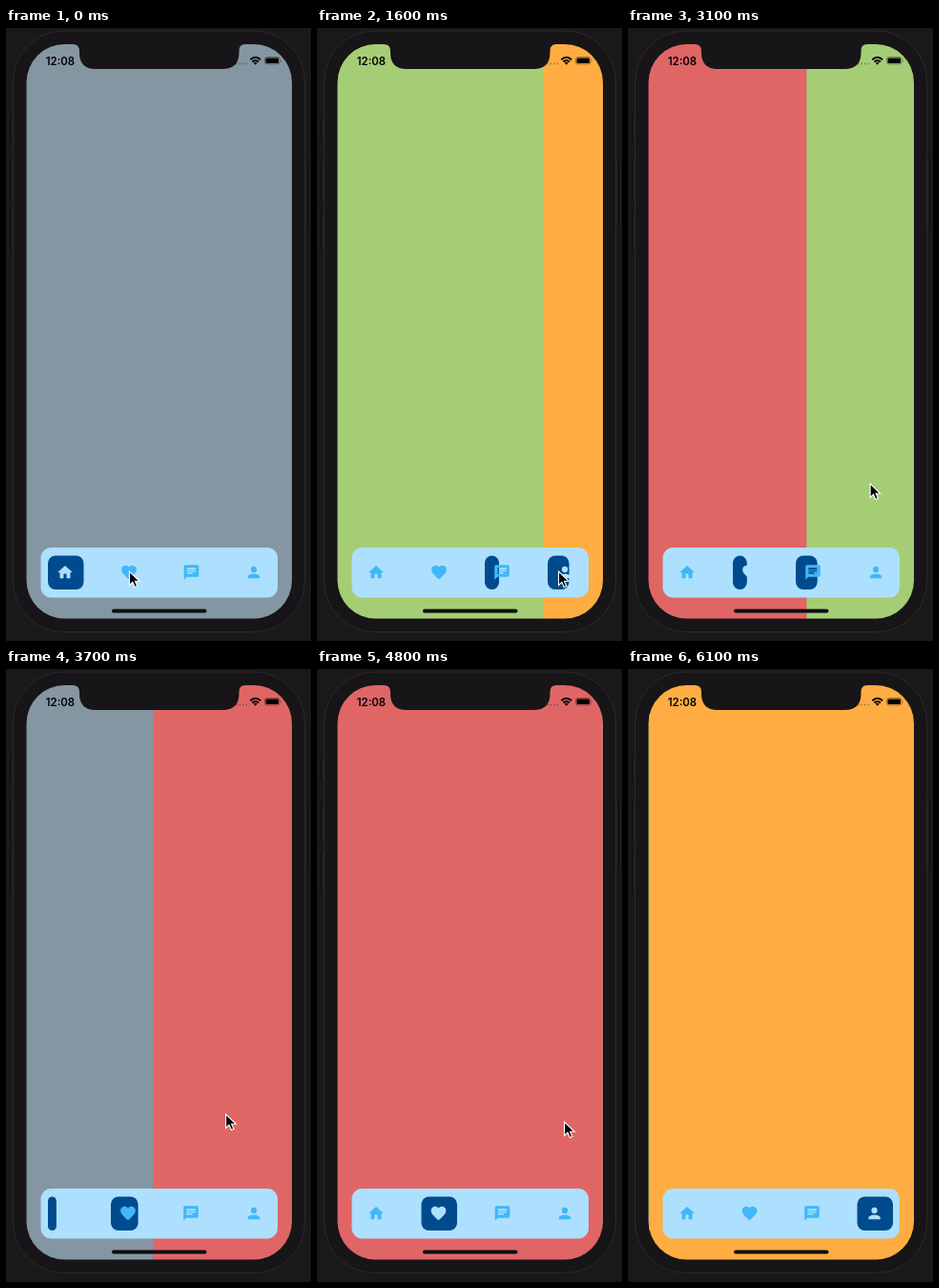
Write an HTML page that moves like this. It is 320 px wide and 643 px high and loops after 6200 ms.

```html
<!DOCTYPE html>
<html lang="en">
<head>
<meta charset="utf-8">
<title>Tab bar with swiping pages</title>
<style>
  html, body { margin: 0; height: 100%; overflow: hidden; background: #1a181a; }
  svg { display: block; width: 100vw; height: 100vh; }
  text { font: 600 11.4px Inter, sans-serif; }
</style>
</head>
<body>
<svg viewBox="0 0 320 643">
  <defs>
    <clipPath id="screen"><rect x="21.5" y="17" width="278.5" height="602.5" rx="40"/></clipPath>
  </defs>
  <rect width="320" height="643" fill="#1a181a"/>
  <g fill="#1f1d1f" stroke="#0c0b0c">
    <rect x="4.5" y="93" width="4" height="24" rx="1"/>
    <rect x="4.5" y="138" width="4" height="44" rx="1"/>
    <rect x="4.5" y="190" width="4" height="44" rx="1"/>
    <rect x="312.5" y="138" width="4" height="74" rx="1"/>
  </g>
  <rect x="7.5" y="3" width="306" height="630.5" rx="53" fill="#171517" stroke="#2b292b"/>
  <g clip-path="url(#screen)"><g id="pages"></g></g>
  <path d="M70 16V17Q77 17 77 24V26Q77 43 94 43H227Q244.5 43 244.5 26V24Q244.5 17 251 17V16Z" fill="#171517"/>
  <text x="41.8" y="38.5">12:08</text>
  <path d="M241 37.5H253" stroke="#000" stroke-opacity=".35" stroke-width="1.5" stroke-dasharray="1.5 2"/>
  <path d="M256.3 33.2Q261.7 28.4 267.1 33.2M258.4 35.5Q261.7 32.6 265 35.5" fill="none" stroke="#000" stroke-width="1.9"/>
  <path d="M259.8 36.6L261.7 38.8 263.6 36.6Q261.7 35 259.8 36.6Z"/>
  <rect x="271.5" y="30.5" width="15.5" height="7.5" rx="2.2" fill="none" stroke="#000" stroke-opacity=".45" stroke-width=".8"/>
  <rect x="272.5" y="31.5" width="13.5" height="5.5" rx="1.3"/>
  <path d="M288 33V36Q289.2 34.5 288 33Z" opacity=".5"/>
  <rect x="36.5" y="545" width="248.5" height="52.5" rx="11" fill="#ade0fe"/>
  <g id="tabs"></g>
  <rect x="111" y="609.5" width="99.5" height="4" rx="2" fill="#0d0e10"/>
  <path id="cursor" d="M0 0V14.5L3.4 11.3 5.7 16.5 8.3 15.4 6 10.3H10.6Z" stroke="#fff" stroke-width="1.1"/>
</svg>
<script>
const LOOP = 6200, STEP = 100, PAGE = 278, LEFT = 22;
const SELECT_TIME = 200, POINTER_HIDES = 6100;
const COLORS = ['#8596a3', '#e06666', '#a5cd76', '#ffad42'];
const ICONS = [
  'M10 20v-6h4v6h5v-8h3L12 3 2 12h3v8z',
  'M12 21.4C5.4 15.4 2 12.3 2 8.5a5.5 5.5 0 0 1 10-3.4 5.5 5.5 0 0 1 10 3.4c0 3.8-3.4 6.9-10 12.9z',
  'M20 2H4a2 2 0 0 0-2 2v18l4-4h14a2 2 0 0 0 2-2V4a2 2 0 0 0-2-2zM6 9h12v2H6zm8 5H6v-2h8zm4-6H6V6h12z',
  'M12 12a4 4 0 1 0 0-8 4 4 0 0 0 0 8zm0 2c-2.7 0-8 1.3-8 4v2h16v-2c0-2.7-5.3-4-8-4z'
];

const tap = (start, page) => ({ start, page, duration: 390, selectAt: start, tapped: true });
// A swipe selects its tab shortly before the page is half way across
const swipe = (start, duration, page, y) =>
  ({ start, page, duration, y, selectAt: start + .42 * duration });
const moves = [
  tap(100, 1), tap(800, 2), tap(1480, 3),
  swipe(1999, 672, 2, 489), swipe(2790, 550, 1, 478), swipe(3349, 723, 0, 467),
  swipe(4107, 351, 1, 477), swipe(4790, 550, 2, 475), swipe(5480, 550, 3, 475)
];
moves.forEach((move, i) => move.from = i ? moves[i - 1].page : 0);

// The pointer rests on a tapped tab, or drags across and travels back for the next swipe
const pointerStops = moves.flatMap(({ start, duration, from, page, y, tapped }) => {
  if (tapped) {
    const x = 67.5 + 62 * page;
    return [{ time: start, x, y: 570 }, { time: start + 200, x, y: 570 }];
  }
  const [x, end] = page < from ? [85, 265] : [265, 85];
  return [{ time: start, x, y }, { time: start + .6 * duration, x: end, y }];
});

const clamp = v => Math.max(0, Math.min(1, v));
const smooth = x => x * x * (3 - 2 * x);
const mix = (a, b, k) => a + (b - a) * k;

function pageAt(t) {
  return moves.reduce((position, { start, duration, from, page }) =>
    position + (page - from) * smooth(clamp((t - start) / duration)), 0);
}

function pointerAt(t) {
  const next = pointerStops.findIndex(stop => stop.time > t);
  if (next < 1) return pointerStops.at(next);
  const a = pointerStops[next - 1], b = pointerStops[next];
  const k = (t - a.time) / (b.time - a.time);
  return { x: mix(a.x, b.x, k), y: mix(a.y, b.y, k) };
}

function set(node, attributes) {
  for (const name in attributes) node.setAttribute(name, attributes[name]);
}
function add(parent, tag, attributes) {
  const node = document.createElementNS('http://www.w3.org/2000/svg', tag);
  set(node, attributes);
  return parent.appendChild(node);
}

const pages = document.getElementById('pages');
const bar = document.getElementById('tabs');
const cursor = document.getElementById('cursor');
COLORS.forEach((fill, i) =>
  add(pages, 'rect', { x: LEFT + i * PAGE - (i ? 0 : 1), y: 17, width: PAGE + 1, height: 603, fill }));
const tabs = ICONS.map(d => ({
  pill: add(bar, 'rect', { y: 553.5, height: 35.5, fill: '#004b8d' }),
  icon: add(bar, 'path', { d })
}));

function drawTabs(t) {
  const last = moves.findLast(move => move.selectAt <= t);
  const selected = last ? last.page : 0;
  const grown = last ? clamp((t - last.selectAt) / SELECT_TIME) : 1;
  const pills = tabs.map((_, i) =>
    37.5 * (i === selected ? grown : last && i === last.from ? 1 - grown : 0));
  // Tabs are spread evenly, and a full pill is wider than a bare icon
  const widths = pills.map(w => Math.max(36, w));
  const gap = (234 - widths.reduce((a, b) => a + b)) / 3;
  let x = 44;
  tabs.forEach(({ pill, icon }, i) => {
    set(pill, { x, width: pills[i], rx: Math.min(8, pills[i] / 2) });
    set(icon, {
      transform: `translate(${x + 18} 571) scale(.78) translate(-12 -12)`,
      fill: i === selected ? '#ade0fe' : '#40b7f8'
    });
    x += widths[i] + gap;
  });
}

function draw() {
  const t = Math.floor(performance.now() % LOOP / STEP) * STEP;
  const { x, y } = pointerAt(t);
  set(pages, { transform: `translate(${-PAGE * pageAt(t)} 0)` });
  drawTabs(t);
  set(cursor, {
    transform: `translate(${x} ${y})`,
    visibility: t < POINTER_HIDES ? 'visible' : 'hidden'
  });
  requestAnimationFrame(draw);
}
draw();
</script>
</body>
</html>
```
